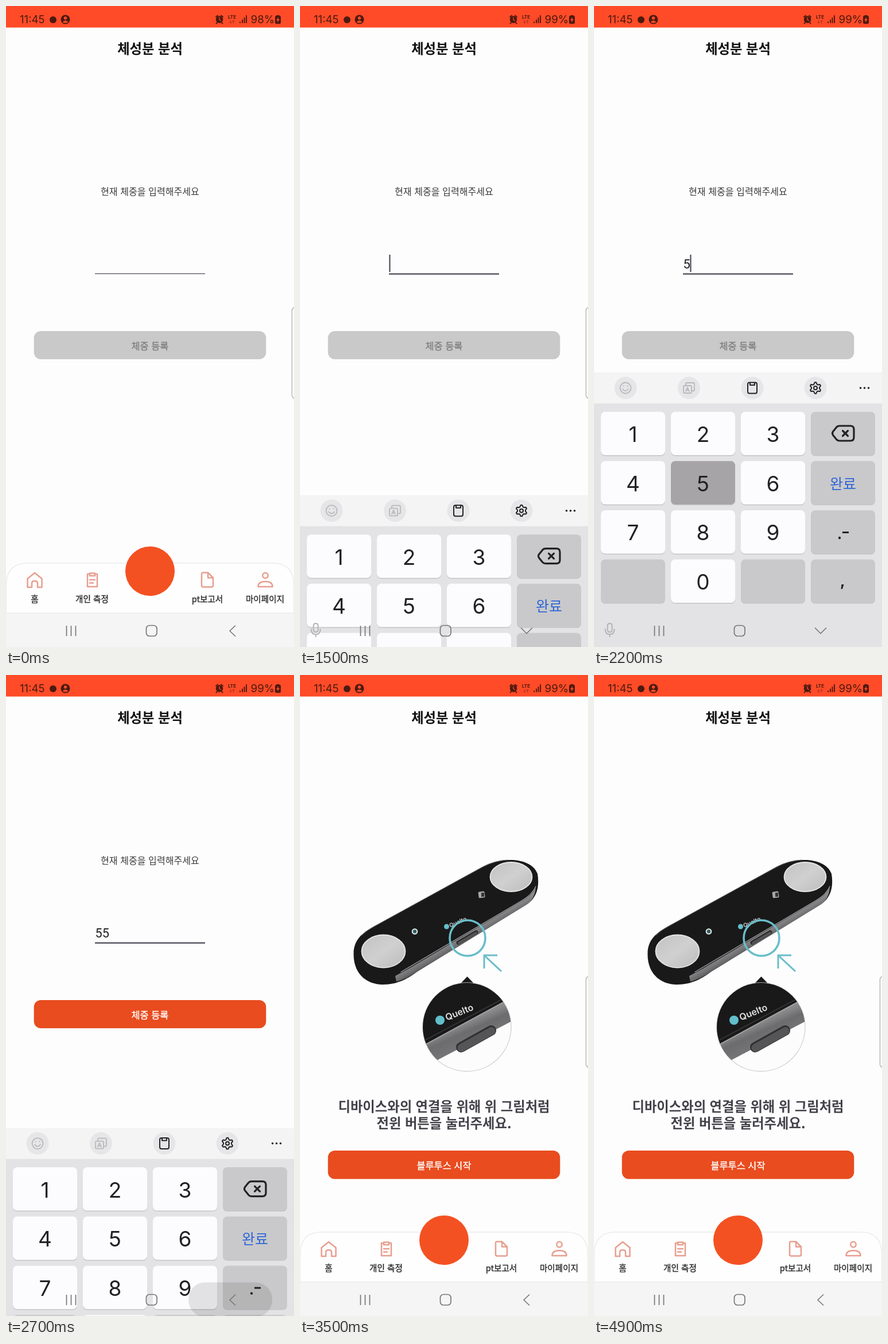
Animation, 502 px wide and 1116 px high, one loop 8 s. Source, as an HTML page:

```html
<!DOCTYPE html>
<html lang="ko">
<head>
<meta charset="utf-8">
<title>체성분 분석</title>
<style>
  html, body { margin: 0; width: 100%; height: 100%; overflow: hidden; background: #fdfdfd; }
  svg { display: block; width: 100%; height: 100%; }
  text { font-family: "Noto Sans CJK KR", "Noto Sans KR", "Noto Sans CJK JP", "Noto Sans CJK", sans-serif; }
  .mid { text-anchor: middle; }
  .inter { font-family: Inter, Roboto, sans-serif; }
  .input { font-family: Roboto, sans-serif; font-size: 21.7px; fill: #222; }
  .line { fill: none; stroke-linecap: round; stroke-linejoin: round; }
  .tab text { font-size: 14.6px; fill: #2b2b2b; stroke: #2b2b2b; stroke-width: .35; }
  .tab .line { stroke: #e79e8f; stroke-width: 2.5; }
  .bold { font-size: 23.3px; font-weight: 700; }
  .action { font-size: 16.4px; stroke-width: .35; }
</style>
</head>
<body>
<svg viewBox="0 0 502 1116" preserveAspectRatio="none">
  <defs>
    <linearGradient id="side" gradientUnits="userSpaceOnUse" x1="290" y1="449" x2="301" y2="468">
      <stop offset="0" stop-color="#8c8c8e"/><stop offset=".55" stop-color="#6a6a6c"/>
      <stop offset="1" stop-color="#3c3c3e"/>
    </linearGradient>
    <linearGradient id="pad" x1="0" y1="0" x2="1" y2="1">
      <stop offset="0" stop-color="#c2c2c3"/><stop offset=".5" stop-color="#d0d0d1"/>
      <stop offset="1" stop-color="#bcbcbd"/>
    </linearGradient>
    <linearGradient id="band" gradientUnits="userSpaceOnUse" x1="290" y1="604" x2="306" y2="640">
      <stop offset="0" stop-color="#8a8a8c"/><stop offset=".4" stop-color="#6c6c6e"/>
      <stop offset="1" stop-color="#757577"/>
    </linearGradient>
    <clipPath id="lens"><circle cx="291" cy="613" r="77"/></clipPath>
  </defs>

  <rect width="502" height="1116" fill="#fdfdfd"/>

  <g id="statusBar" fill="#4d1a10">
    <rect width="502" height="37.5" fill="#ff4b27"/>
    <text class="inter" x="24" y="30" font-size="18.6">11:45</text>
    <circle cx="82" cy="24" r="6"/>
    <circle cx="103.5" cy="23.5" r="8"/>
    <g fill="#ff4b27"><circle cx="103.5" cy="21" r="2.7"/><path d="M98.5 28Q103.5 22.5 108.5 28Q103.5 31 98.5 28Z"/></g>
    <circle cx="372" cy="23.5" r="6.2"/>
    <path class="line" d="M366 19L369 16.5M378 19L375 16.5M368 29L366.5 30.5M376 29L377.5 30.5" stroke="#4d1a10" stroke-width="1.8"/>
    <path class="line" d="M372 20V24L374.5 25.5" stroke="#ff4b27" stroke-width="1.3"/>
    <text class="inter mid" x="394" y="22" font-size="8" font-weight="700">LTE</text>
    <path class="line" d="M391.5 25V30L389.5 28M391.5 30L393.5 28M396.5 30V25L394.5 27M396.5 25L398.5 27" stroke="#ad301c"/>
    <path class="line" d="M408 28V29M412 24.5V29M415.5 21V29M419 17V29" stroke="#4d1a10" stroke-width="1.9"/>
    <text class="inter" id="battery" x="426.5" y="30" font-size="18.8">98%</text>
    <path d="M471.5 17V16H476.5V17Q479 17 479 19V28.5Q479 31 476.5 31H471.5Q469 31 469 28.5V19Q469 17 471.5 17Z"/>
    <path d="M475 19L471 25H473.5L473 29L477 23H474.5Z" fill="#ff4b27"/>
  </g>
  <text class="mid bold" x="251" y="82.5" fill="#111">체성분 분석</text>

  <g id="weightPage">
    <text class="mid" x="251" y="329" font-size="16.1" fill="#3c3c3e">현재 체중을 입력해주세요</text>
    <text class="input" id="weight" x="155.5" y="457"></text>
    <rect id="cursor" y="433" width="2.3" height="30" fill="#55535f"/>
    <rect id="underline" x="155" width="192" fill="#55535f"/>
    <rect id="register" x="48.7" y="566" width="404.6" height="49" rx="12"/>
    <text class="mid action" id="registerLabel" x="251" y="598">체중 등록</text>
  </g>

  <g id="devicePage">
    <path d="M93.500 486C93 458 114 446 130 437L318 334C352 315 404 318 414 346C418 370 412 388 396 399L205 516C190 527 172 539 144 539C108 538 93 512 93.500 486Z" fill="#19191a"/>
    <path d="M166 524L190 511L388 393Q404 384 411 370Q409 390 396 399L205 516Q186 529 168 534Z" fill="url(#side)"/>
    <path class="line" d="M176 517L388 392Q405 382 411 368" stroke="#a2a2a4" stroke-width="1.3"/>
    <path class="line" d="M108 453Q117 444 130 437.500L318 334.500Q340 323 362 322" stroke="#5e5e60" stroke-width="1"/>
    <g fill="url(#pad)" stroke="#e6e6e7" stroke-width="1.8">
      <ellipse cx="145.5" cy="481" rx="38" ry="28.5"/>
      <ellipse cx="368" cy="351.5" rx="36.5" ry="25.5"/>
    </g>
    <circle cx="200" cy="446.5" r="4.3" fill="#355d60" stroke="#e5eeee" stroke-width="2"/>
    <rect x="311" y="377" width="11" height="11" rx="2" fill="#a8a8a8" transform="rotate(-8 316 382)"/>
    <rect x="316" y="379" width="5" height="7" fill="#333"/>
    <circle cx="255.5" cy="438" r="4.5" fill="#62bfca"/>
    <text class="inter" font-size="10" font-weight="600" fill="#d6d6d7" transform="translate(262 440) rotate(-24)">Quelto</text>
    <path class="line" d="M276 466L307 448" stroke="#2b2b2c" stroke-width="7"/>
    <path class="line" d="M277 466.500L307 449" stroke="#545456" stroke-width="4"/>
    <circle cx="292" cy="458" r="31" fill="none" stroke="#6abdc9" stroke-width="3.6"/>
    <path fill="none" d="M351 516L321 488M344 488H321V511" stroke="#6abdc9" stroke-width="3"/>

    <path d="M278 539L291.5 525L305 539Z" fill="#19191a"/>
    <circle cx="291" cy="613" r="77" fill="#fcfcfc" stroke="#d4d4d5" stroke-width="1.5"/>
    <g clip-path="url(#lens)">
      <path d="M200 520H380V558L210 648Z" fill="#19191a"/>
      <path d="M210 648L380 556V597L225 678Z" fill="url(#band)"/>
      <path class="line" d="M210 640L370 555" stroke="#39393a" stroke-width="1.5"/>
      <path class="line" d="M210 648L380 556" stroke="#a0a0a2" stroke-width="2"/>
      <path class="line" d="M281 648L333 619" stroke="#303031" stroke-width="18"/>
      <path class="line" d="M281.5 649L333.5 620" stroke="#555557" stroke-width="14"/>
    </g>
    <circle cx="244" cy="601" r="8" fill="#62bfca"/>
    <text class="inter" font-size="16" font-weight="600" fill="#e2e2e3" transform="translate(256 602) rotate(-22)">Quelto</text>

    <g class="mid bold" fill="#444249">
      <text x="251" y="759.5">디바이스와의 연결을 위해 위 그림처럼</text>
      <text x="251" y="789">전윈 버튼을 눌러주세요.</text>
    </g>
    <rect x="48.7" y="828" width="404.6" height="49.5" rx="12" fill="#e84c1f"/>
    <text class="mid action" x="251" y="860" fill="#fff" stroke="#fff">블루투스 시작</text>
  </g>

  <rect id="edgeHandle" x="498.5" y="525" width="12" height="158" rx="5" fill="#fff" stroke="#a9a9a9" stroke-width="1.2"/>
  <rect y="1057" width="502" height="59" fill="#f5f5f5"/>

  <g id="tabBar" class="tab">
    <path d="M.5 1057V1008Q.5 970 38 970H464Q501.5 970 501.5 1008V1057Z" fill="#fefefe" stroke="#ececec" stroke-width="1.3"/>
    <circle cx="251" cy="984" r="43" fill="#f45122"/>
    <path class="line" d="M37.5 997L50 987L62.5 997V1012H55V1005Q55 1001 50 1001T45 1005V1012H37.5Z"/>
    <path class="line" d="M146 989H142V1011H159V989H155M146 987.5H155V992H146ZM146 999H155M146 1004.5H152"/>
    <path class="line" d="M343 986.5H352L361 995.5V1009Q361 1011.5 358.5 1011.5H343.5Q341 1011.5 341 1009V989Q341 986.5 343 986.5ZM352 987V995.5H361"/>
    <circle class="line" cx="452" cy="991.5" r="4.7"/>
    <path class="line" d="M439.5 1011Q439.5 1002 452 1002T464.5 1011Z"/>
    <g class="mid">
      <text x="50" y="1038">홈</text><text x="150" y="1038">개인 측정</text>
      <text x="351" y="1038">pt보고서</text><text x="451.5" y="1038">마이페이지</text>
    </g>
  </g>

  <g id="keyboard">
    <rect y="638" width="502" height="55" fill="#f4f4f5"/>
    <rect y="692" width="502" height="500" fill="#e3e3e5"/>
    <g id="toolCircles" fill="#e6e6e8"></g>
    <g class="line" stroke="#b9b9bb" stroke-width="1.8">
      <circle cx="55" cy="665" r="9.5"/>
      <path d="M50 667Q55 673 60 667M51.5 661.5V662M58.5 661.5V662"/>
      <path d="M160 661V658Q160 656 162 656H173Q175 656 175 658V668Q175 670 173 670H171M158 661H168Q170 661 170 663V672Q170 674 168 674H158Q156 674 156 672V663Q156 661 158 661ZM160 671L163 664L166 671M161 669H165"/>
    </g>
    <g class="line" stroke="#222225" stroke-width="2">
      <rect x="268" y="655.5" width="16" height="19" rx="3"/>
      <path d="M272 656V660H280V656"/>
      <path id="gear"/>
      <circle cx="386" cy="665" r="3"/>
    </g>
    <path class="line" d="M464.5 665H464.6M471.5 665H471.6M478.5 665H478.6" stroke="#222" stroke-width="3.5"/>
    <g id="keys"></g>
    <g class="line" stroke="#222225" stroke-width="3.2">
      <path d="M428 731H447Q453 731 453 737V751Q453 757 447 757H428Q425 757 423 755L416.5 747Q414.5 744 416.5 741L423 733Q425 731 428 731Z"/>
      <path d="M433.5 739.5L442.5 748.5M442.5 739.5L433.5 748.5"/>
    </g>
    <text class="mid" x="434" y="840.5" font-size="25" fill="#2d66d5">완료</text>
    <g fill="#222225">
      <circle cx="428" cy="926" r="2.2"/><rect x="433" y="915" width="11" height="3"/>
      <path d="M431.5 1007H435.5L433 1015H430.5Z"/>
    </g>
  </g>

  <rect id="backRipple" x="318" y="1057.5" width="146" height="60" rx="29" fill="#000" fill-opacity=".1"/>
  <g class="line" stroke="#77777a" stroke-width="1.7">
    <path d="M105.5 1079V1097M113.5 1079V1097M121.5 1079V1097" stroke-linecap="butt"/>
    <rect x="244.5" y="1078.5" width="18.5" height="18.5" rx="5.5"/>
    <path id="backIcon"/>
    <path id="mic" stroke="#b3b3b5" stroke-width="2" d="M27.5 1075Q31.5 1075 31.5 1079V1086Q31.5 1090 27.5 1090T23.5 1086V1079Q23.5 1075 27.5 1075ZM19.5 1085Q19.5 1094 27.5 1094T35.5 1085M27.5 1094V1098"/>
  </g>
</svg>
<script>
const LOOP = 8000, STEP = 100;
const KEYBOARD_HEIGHT = 478, SLIDE = 508, OPEN_START = 1228, CLOSE_START = 2510;
const $ = id => document.getElementById(id);

function add(parent, tag, attrs, label = "") {
  const node = document.createElementNS(parent.namespaceURI, tag);
  for (const name in attrs) node.setAttribute(name, attrs[name]);
  node.textContent = label;
  return parent.appendChild(node);
}

function set(id, attrs) {
  for (const name in attrs) $(id).setAttribute(name, attrs[name]);
}

function show(id, visible) {
  $(id).style.display = visible ? "" : "none";
}

function buildKeyboard() {
  for (const x of [55, 165.5, 276, 386]) add($("toolCircles"), "circle", { cx: x, cy: 665, r: 19.5 });

  const labels = ["123<", "456!", "789.", " 0 ,"];
  const keyByLabel = {};
  labels.forEach((row, r) => [...row].forEach((label, c) => {
    const x = 12 + 122 * c, y = 706.5 + 85.7 * r;
    const isDigit = label >= "0" && label <= "9";
    const shape = { x, width: 112, height: 75.5, rx: 7.5 };
    add($("keys"), "rect", { ...shape, y: y + 1.5, fill: "#c5c5c8" });
    keyByLabel[label] = add($("keys"), "rect", { ...shape, y, fill: isDigit ? "#fcfcfe" : "#c9c9cb" });
    if (isDigit) {
      add($("keys"), "text", { class: "inter mid", x: x + 56, y: y + 52.5, "font-size": 37, fill: "#222225" }, label);
    }
  }));
  return keyByLabel;
}

function gearPath() {
  const points = [];
  for (let i = 0; i < 24; i++) {
    const radius = i % 4 < 2 ? 9.8 : 7, angle = (i - 0.5) * Math.PI / 12;
    points.push(`${386 + radius * Math.sin(angle)} ${665 - radius * Math.cos(angle)}`);
  }
  return `M${points.join("L")}Z`;
}

function smooth(p) {
  p = Math.min(1, Math.max(0, p));
  return p * p * (3 - 2 * p);
}

const keys = buildKeyboard();
set("gear", { d: gearPath() });

function render(t) {
  const between = (from, to) => t >= from && t < to;
  const typing = between(1300, 3000);
  const closing = t >= 2600;
  const focused = t >= 1300;

  const raised = smooth((t - OPEN_START) / SLIDE) - smooth((t - CLOSE_START) / SLIDE);
  set("keyboard", { transform: `translate(0 ${KEYBOARD_HEIGHT * (1 - raised)})` });
  show("keyboard", typing);
  show("tabBar", !typing);
  show("mic", typing && !closing);
  show("edgeHandle", !between(1600, 3000));
  show("backRipple", between(2600, 2900));
  set("backIcon", {
    d: typing && !closing ? "M385.5 1083L395 1092.5L404.5 1083" : "M399.5 1079L390 1088L399.5 1097"
  });

  const weight = "5".repeat((t >= 2100) + (t >= 2300));
  const ready = weight.length === 2;
  const pressed = between(2000, 2100) || between(2200, 2300);
  const labelColor = ready ? "#fff" : "#7f7f80";
  keys[5].setAttribute("fill", pressed ? "#a6a4a7" : "#fcfcfe");
  $("weight").textContent = weight;
  set("cursor", { x: 155.3 + 12 * weight.length });
  show("cursor", between(1300, 2600));
  set("underline", focused ? { y: 465.3, height: 2.4 } : { y: 465.4, height: 1.3 });
  set("register", { fill: ready ? "#e84c1f" : "#c9c9ca" });
  set("registerLabel", { fill: labelColor, stroke: labelColor });
  $("battery").textContent = focused ? "99%" : "98%";

  show("weightPage", t < 3200);
  show("devicePage", t >= 3200);
}

const start = performance.now();
function tick() {
  const t = (performance.now() - start) % LOOP;
  render(Math.floor(t / STEP) * STEP);
  requestAnimationFrame(tick);
}
tick();
</script>
</body>
</html>
```
